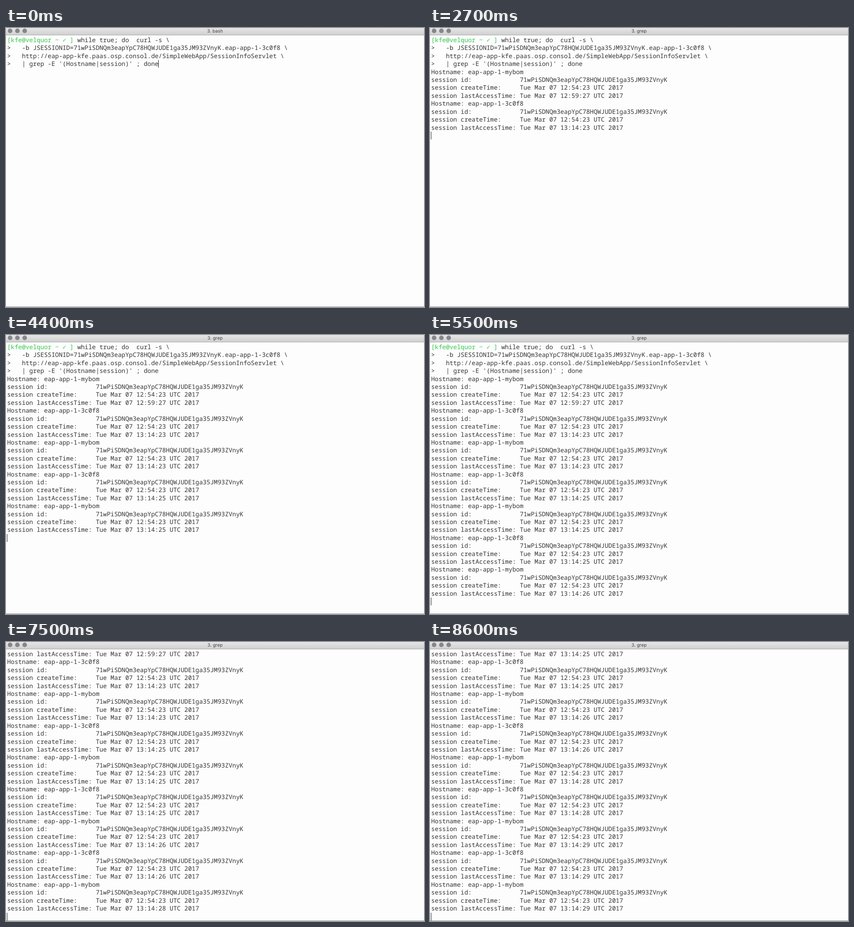
Animation of 917x611 px, one loop 8700 ms. Source, as an HTML page with a canvas:

```html
<!DOCTYPE html>
<html lang="en">
<head>
<meta charset="utf-8">
<title>Terminal</title>
<style>
  html, body { margin: 0; width: 100%; height: 100%; overflow: hidden; background: #fdfdfd; }
  canvas { display: block; }
</style>
</head>
<body>
<canvas id="stage" width="917" height="611"></canvas>
<script>
const ctx = document.getElementById('stage').getContext('2d');
const WIDTH = 917, HEIGHT = 611, LOOP = 8700;
const CELL = 8.1, ROW = 17.41, LEFT = 2.5, TOP = 18, VISIBLE_ROWS = 34;
const ENTER_TIME = 1600;
const INK = '#343434', GREEN = '#35c84e';

const SESSION = '71wPiSDNQm3eapYpC78HQWJUDE1ga35JM93ZVnyK';
const PROMPT = '[kfe@velquor ~ ✓ ]';
const COMMAND = [
  PROMPT + ' while true; do  curl -s \\',
  `>   -b JSESSIONID=${SESSION}.eap-app-1-3c0f8 \\`,
  '>   http://eap-app-kfe.paas.osp.consol.de/SimpleWebApp/SessionInfoServlet \\',
  ">   | grep -E '(Hostname|session)' ; done"
];

// Each response: arrival in ms, last access time reported by the server
const RESPONSES = [
  [1900, '12:59:27'], [2300, '13:14:23'], [3500, '13:14:23'], [3900, '13:14:25'],
  [4200, '13:14:25'], [4500, '13:14:25'], [4800, '13:14:26'], [7100, '13:14:26'],
  [7400, '13:14:28'], [7700, '13:14:28'], [8000, '13:14:29'], [8200, '13:14:29'],
  [8500, '13:14:29']
];

const field = (label, value) => `session ${label}:`.padEnd(24) + value;
const date = time => `Tue Mar 07 ${time} UTC 2017`;

function responseLines([, lastAccess], index) {
  return [
    'Hostname: eap-app-1-' + (index % 2 ? '3c0f8' : 'mybom'),
    field('id', SESSION),
    field('createTime', date('12:54:23')),
    field('lastAccessTime', date(lastAccess))
  ];
}

function drawTitleBar(title) {
  const shade = ctx.createLinearGradient(0, 0, 0, 15);
  shade.addColorStop(0, '#e6e6e6');
  shade.addColorStop(1, '#d0d0d0');
  ctx.fillStyle = shade;
  ctx.fillRect(0, 0, WIDTH, 15);
  ctx.fillStyle = '#a9a9a9';
  ctx.fillRect(0, 15, WIDTH, 1);

  ctx.fillStyle = '#85858b';
  for (const x of [9, 25, 41]) {
    ctx.beginPath();
    ctx.arc(x, 6.3, 5, 0, 2 * Math.PI);
    ctx.fill();
  }

  ctx.font = '10px Inter, "Liberation Sans", sans-serif';
  ctx.textAlign = 'center';
  ctx.fillStyle = '#444';
  ctx.fillText(title, 458.7, 10);
}

// Words sit on the terminal's character grid
function drawLine(text, row) {
  for (const word of text.matchAll(/\S+/g)) {
    const inPrompt = text.startsWith(PROMPT) && word.index < PROMPT.length;
    ctx.fillStyle = inPrompt ? GREEN : INK;
    ctx.fillText(word[0], LEFT + word.index * CELL, TOP + 13 + row * ROW);
  }
}

function draw(time) {
  const running = time >= ENTER_TIME;
  const output = RESPONSES.filter(([arrival]) => time >= arrival).flatMap(responseLines);
  const lines = [...COMMAND, ...output];
  if (running) lines.push('');
  const shown = lines.slice(-VISIBLE_ROWS);

  ctx.fillStyle = '#fdfdfd';
  ctx.fillRect(0, 0, WIDTH, HEIGHT);
  drawTitleBar(running ? '3. grep' : '3. bash');

  ctx.font = '300 13.5px "Noto Sans Mono", "DejaVu Sans Mono", monospace';
  ctx.textAlign = 'left';
  shown.forEach(drawLine);

  const cursorRow = shown.length - 1;
  ctx.fillStyle = '#222';
  ctx.fillRect(Math.floor(LEFT + shown[cursorRow].length * CELL), Math.round(TOP + cursorRow * ROW), 1, 17);

  ctx.fillStyle = '#8f8f8f';
  ctx.fillRect(0, HEIGHT - 1, WIDTH, 1);
}

ctx.textRendering = 'geometricPrecision';
const start = performance.now();
function tick() {
  draw((performance.now() - start) % LOOP);
  requestAnimationFrame(tick);
}
tick();
</script>
</body>
</html>
```
